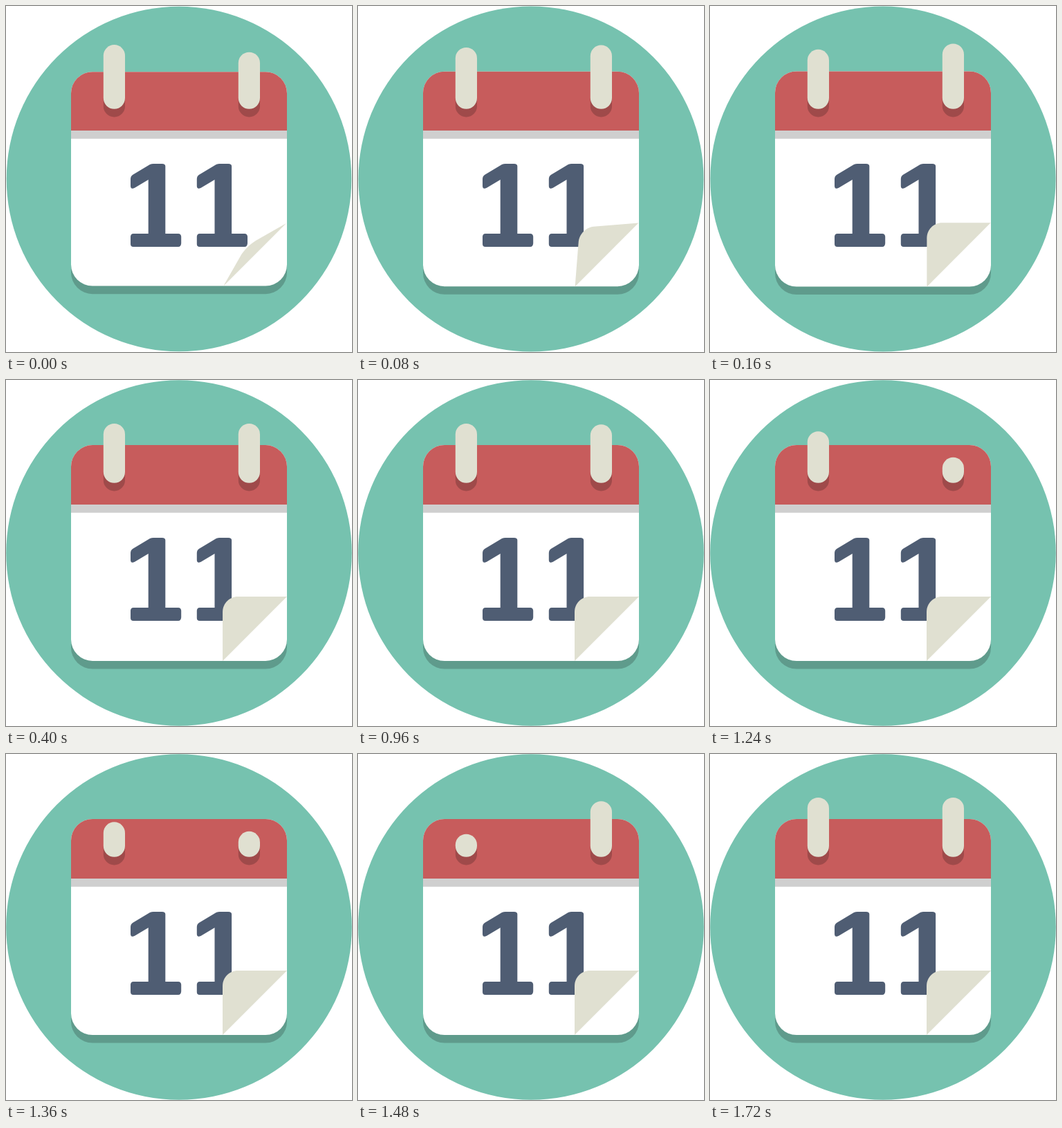
An HTML page with a canvas that plays this animation: 500x500 px, repeating every 1.92 s.

```html
<!DOCTYPE html>
<html>
<head>
<meta charset="utf-8">
<title>Calendar</title>
<style>
html, body { margin: 0; width: 100%; height: 100%; overflow: hidden; background: #fff; }
canvas { display: block; width: 500px; height: 500px; }
</style>
</head>
<body>
<canvas id="stage" width="500" height="500"></canvas>
<script>
const ctx = document.getElementById('stage').getContext('2d');
const LOOP = 1920, STEP = 40;
const TEAL = '#76c2af', TEAL_DARK = '#5f9b8c', RED = '#c75c5c', RED_DARK = '#9f4a4a';
const CREAM = '#e0e0d1', GREY = '#cfcfcf', SLATE = '#4f5d73';

const REST = 63, RING_BOTTOM = 148.7, RING_W = 31.2;
const DIP = 54, DIP_DOWN = 400, DIP_UP = 200;
const RISE = 600;

const ONE = new Path2D('M205.7 251 L186 262.7 Q180 265.5 180 260 V250 Q180 246 183 244' +
  ' L208 229 Q210.5 228 213 228 H225.5 Q230.3 228 230.3 231.5 V329 H249 Q252.6 329 253.2 333' +
  ' V343 Q252.8 348 249 348 H184 Q180 348 180 344 V333 Q180.5 329 184 329 H205.7 Z');

const clamp = v => Math.min(1, Math.max(0, v));
const sine = u => (1 - Math.cos(Math.PI * clamp(u))) / 2;

// Overshooting ease-out
function back(u) {
  const w = 1 - clamp(u);
  return 1 - 2.70158 * w ** 3 + 1.70158 * w ** 2;
}

function ringTop(t, riseEnd, dipStart) {
  const rise = back((t - riseEnd + RISE) / RISE);
  const down = sine((t - dipStart) / DIP_DOWN);
  const up = sine((t - dipStart - DIP_DOWN) / DIP_UP);
  return REST + 86 * (1 - rise) + DIP * (down - up);
}

function round(x, y, w, h, r, color) {
  ctx.fillStyle = color;
  ctx.beginPath();
  ctx.roundRect(x, y, w, h, r);
  ctx.fill();
}

function ring(x, top) {
  const r = RING_W / 2;
  round(x, 133, RING_W, 27.4, [0, 0, r, r], RED_DARK);
  round(x, top, RING_W, RING_BOTTOM - top, r, CREAM);
}

// Flap lifted from its crease; k = 1 is fully folded
function curl(k, inset) {
  const a = 313 + inset, b = 406 - inset, sum = a + b;
  const at = (x, y) => {
    const d = (sum - x - y) / 2 * (1 - k);
    return [x + d, y + d];
  };
  ctx.fillStyle = CREAM;
  ctx.beginPath();
  ctx.moveTo(b, a);
  ctx.lineTo(...at(a + 22, a));
  ctx.bezierCurveTo(...at(a + 10, a), ...at(a, a + 10), ...at(a, a + 22));
  ctx.lineTo(a, b);
  ctx.fill();
}

function draw(t) {
  const settle = t < 680 ? Math.exp(-t / 160) : 0;
  const top = 94 + 1.2 * settle, bottom = 406 - 1.4 * settle;

  ctx.fillStyle = '#fff';
  ctx.fillRect(0, 0, 500, 500);
  ctx.fillStyle = TEAL;
  ctx.beginPath();
  ctx.arc(250, 250, 249.8 - 0.5 * settle, 0, 2 * Math.PI);
  ctx.fill();

  round(94, top + 11.6, 312, bottom - top, 31, TEAL_DARK);
  round(94, top, 312, bottom - top, 31, '#fff');
  round(94, top, 312, 180 - top, [31, 31, 0, 0], RED);
  ctx.fillStyle = GREY;
  ctx.fillRect(94, 180, 312, 11.8);

  ctx.fillStyle = SLATE;
  ctx.fill(ONE);
  ctx.save();
  ctx.translate(95.8, 0);
  ctx.fill(ONE);
  ctx.restore();

  curl(sine((t + 70) / 200), settle);
  ring(140.8, ringTop(t, 180, 1120));
  ring(335.8, ringTop(t, 400, 920));
}

const start = performance.now();
function tick() {
  const t = (performance.now() - start) % LOOP;
  draw(Math.floor(t / STEP) * STEP);
  requestAnimationFrame(tick);
}
tick();
</script>
</body>
</html>
```
